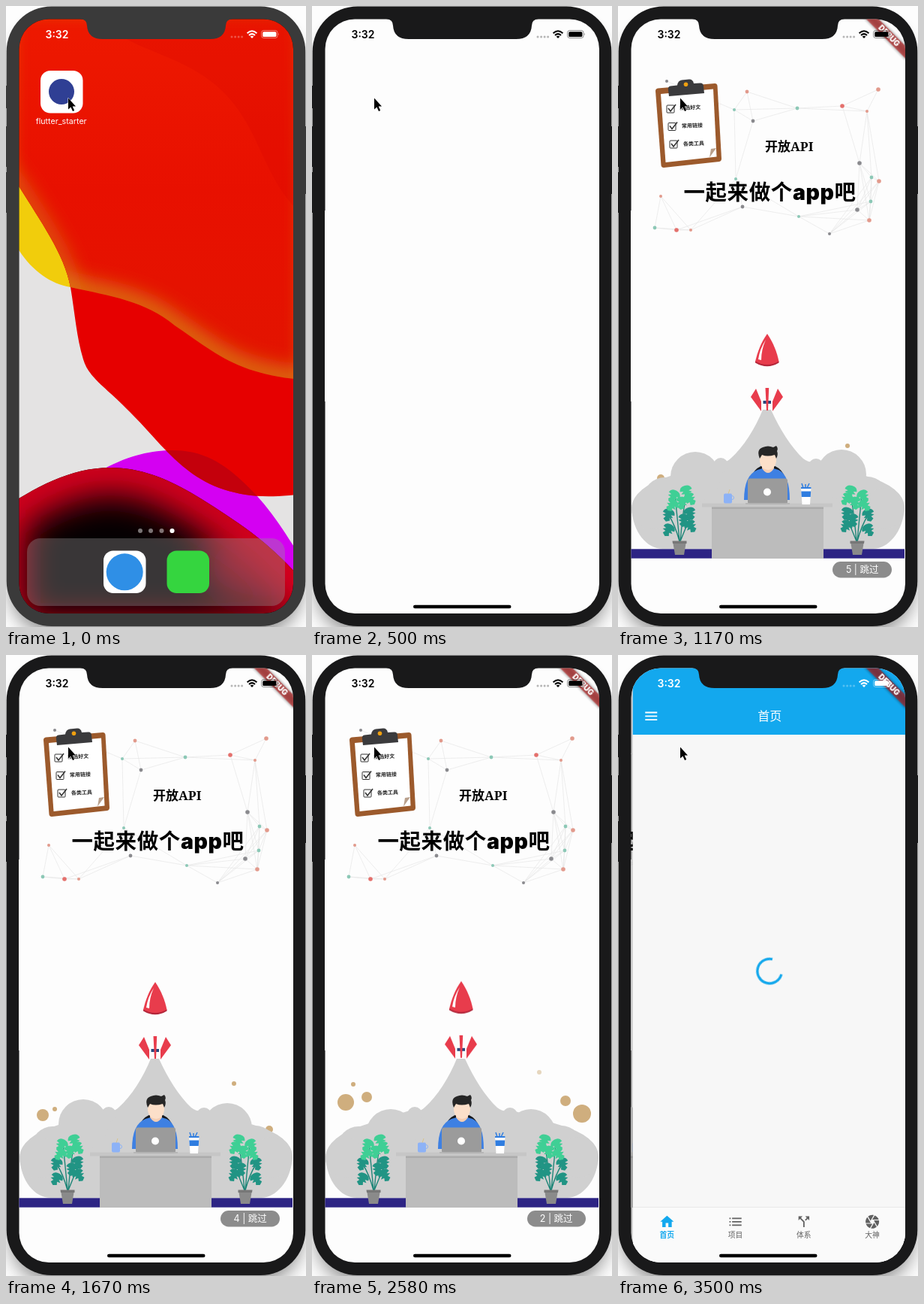
These frames come from a looping animation (400x826 px, 3.58 s). An HTML page:

```html
<!DOCTYPE html>
<html lang="zh">
<head>
<meta charset="utf-8">
<title>App launch</title>
<style>
html, body { margin: 0; height: 100%; overflow: hidden; background: #fdfdfd; }
svg { display: block; width: 100%; height: 100%; font-family: Inter, "Noto Sans CJK SC", "Noto Sans CJK", sans-serif; }
.mid { text-anchor: middle; }

/* Every animation is scrubbed by the clock through --d */
.a { animation: 3580ms linear var(--d, 0ms) infinite paused; }
.case { animation-name: wake; fill: currentColor; }
.home { animation-name: dim; }
.wall { animation-name: sink; }
.icons { animation-name: shrink; transform-origin: 200px 413px; }
.hbar { animation-name: hbar; color: #fff; }
.card { animation-name: open; fill: #fdfdfd; }
.bar { animation-name: bar; }
.pill { animation-name: pill; }
.pad { animation-name: pad; }
.banner { animation-name: late; }
.splash { animation-name: splash; }
.lottie { animation-name: lottie; }
.rocket { animation-name: lift; }
.page { animation-name: slide; }
.ring { animation-name: spin; transform-origin: 200.4px 420.5px; }
.ball { animation-name: rise; }

@keyframes wake { 0%, 1% { color: #3a3a3a } 1.2%, 100% { color: #19191a } }
@keyframes dim {
  0%, 1.2% { filter: blur(0) brightness(1) }
  2.33% { filter: blur(2px) brightness(.9) }
  4.65% { filter: blur(7px) brightness(.6) }
  9.3% { filter: blur(10px) brightness(.5); visibility: visible }
  13%, 100% { filter: blur(10px) brightness(.5); visibility: hidden }
}
@keyframes sink { 0%, 1.2% { transform: none } 4.65%, 100% { transform: translateY(8px) } }
@keyframes shrink { 0%, 1.2% { transform: none } 4.65% { transform: scale(.965) } 9.3%, 100% { transform: scale(.94) } }
@keyframes hbar { 0%, 1.2% { opacity: 1 } 4.65% { opacity: .42 } 7%, 100% { opacity: 0 } }
@keyframes open {
  0%, 1.2% { x: 46px; y: 86px; width: 57px; height: 57px; rx: 13px; opacity: 0 }
  2.33% { x: 42px; y: 86px; width: 100px; height: 130px; rx: 20px; opacity: .6 }
  4.65% { x: 26px; y: 75px; width: 275px; height: 502px; rx: 39px; opacity: 1 }
  6.98% { x: 19px; y: 27px; width: 350px; height: 725px; rx: 39px }
  9.3% { x: 18px; y: 19px; width: 363px; height: 782px; rx: 38px }
  11.63%, 100% { x: 17px; y: 17px; width: 367px; height: 792px; rx: 38px; opacity: 1 }
}
@keyframes bar {
  0%, 3% { opacity: 0; color: #000; transform: translate(12.8px, 61.4px) scale(.753) }
  4.65% { opacity: 1; transform: translate(12.8px, 61.4px) scale(.753) }
  6.98% { transform: translate(1.7px, 9.7px) scale(.959) }
  9.3% { transform: translate(.1px, 1.1px) scale(.9945) }
  11.63% { transform: none }
  89.5% { color: #000 }
  89.6%, 100% { color: #fff; opacity: 1; transform: none }
}
@keyframes pill { 0%, 8% { opacity: 0 } 13.9%, 100% { opacity: 1 } }
@keyframes late { 0%, 22.5% { visibility: hidden } 22.6%, 100% { visibility: visible } }
@keyframes lottie { 0%, 24.5% { visibility: hidden } 24.6%, 100% { visibility: visible } }
@keyframes splash {
  0%, 22.5% { opacity: 0 }
  22.6% { opacity: 1 }
  87.15% { opacity: 1; transform: none; animation-timing-function: cubic-bezier(.35, .91, .33, .97) }
  98.74%, 100% { opacity: 1; transform: translateX(-122px) }
}
@keyframes slide {
  0%, 87.15% { transform: translateX(376px); animation-timing-function: cubic-bezier(.35, .91, .33, .97) }
  98.74%, 100% { transform: none }
}
@keyframes pad { 0%, 71% { x: 286px; width: 79px } 71.1%, 100% { x: 287px; width: 78px } }
@keyframes lift { 0%, 32.56% { transform: none } 46.51% { transform: translateY(-1px) } 72.09% { transform: translateY(-2.2px) } 100% { transform: translateY(-3px) } }
@keyframes spin { 0%, 87% { transform: rotate(-200deg) } 97.67% { transform: rotate(15deg) } 100% { transform: rotate(60deg) } }
@keyframes rise {
  0%, 24% { transform: translate(var(--p0)) scale(var(--s)) }
  32.56% { transform: translate(var(--p0)) scale(var(--r0)) }
  46.51% { transform: translate(var(--p1)) scale(var(--r1)); opacity: 1 }
  72.09% { transform: translate(var(--p2)) scale(var(--r2)); opacity: var(--o, 1) }
  88.37%, 100% { transform: translate(var(--p3)) scale(var(--r3)); opacity: calc(var(--o, 1) * 2 - 1) }
}
</style>
</head>
<body>
<svg viewBox="0 0 400 826">
<defs>
  <clipPath id="screen"><rect x="17.5" y="17.5" width="365.5" height="790.5" rx="39.5"/></clipPath>
  <path id="red" d="M-10-10V205L18 241C45 285 78 330 86 374C92 410 94 440 103 470C110 495 135 508 170 545C205 580 235 625 290 643C325 654 355 655 410 647V-10Z"/>
  <path id="warm" d="M-10-10V290L18 326C35 352 60 370 86 374C140 386 185 392 225 425C280 462 310 493 410 498V-10Z"/>
  <path id="violet" d="M130 616C165 597 195 591 222 591C270 591 300 615 335 652C360 680 375 705 410 760V830H130Z"/>
  <path id="hill" d="M-10 672C40 640 85 614 140 614C205 614 260 655 310 688C345 712 370 735 410 780V850H-10Z"/>
  <clipPath id="inRed"><use href="#red"/></clipPath>
  <clipPath id="inWarm"><use href="#warm"/></clipPath>
  <clipPath id="inHill"><use href="#hill"/></clipPath>
  <linearGradient id="warmFill" x2="0" y2="1"><stop stop-color="#ee1a00"/><stop offset=".5" stop-color="#e81000"/><stop offset="1" stop-color="#e21400"/></linearGradient>
  <linearGradient id="edge"><stop stop-color="#000" stop-opacity="0"/><stop offset="1" stop-color="#000" stop-opacity=".25"/></linearGradient>
  <filter id="soft" x="-30%" y="-30%" width="160%" height="160%"><feGaussianBlur stdDeviation="13"/></filter>
  <filter id="haze" x="-50%" y="-50%" width="200%" height="200%"><feGaussianBlur stdDeviation="22"/></filter>
  <filter id="thin" x="-30%" y="-30%" width="160%" height="160%"><feGaussianBlur stdDeviation="2"/></filter>

  <g id="status">
    <text class="mid" x="68" y="43" font-size="14" font-weight="600" fill="currentColor">3:32</text>
    <g fill="currentColor" opacity=".28"><circle cx="301" cy="41" r="1.5"/><circle cx="305.6" cy="41" r="1.5"/><circle cx="310.1" cy="41" r="1.5"/><circle cx="314.6" cy="41" r="1.5"/></g>
    <g fill="none" stroke="currentColor" stroke-width="2"><path d="M321.6 36.2Q328 30.4 334.4 36.2"/><path d="M324 39Q328 35.3 332 39"/></g>
    <path d="M328 43L325.6 40.6Q328 38.7 330.4 40.6Z" fill="currentColor"/>
    <rect x="340.6" y="32.6" width="21.4" height="9.9" rx="2.8" fill="none" stroke="currentColor" opacity=".45"/>
    <rect x="342.2" y="34.2" width="18.2" height="6.7" rx="1.5" fill="currentColor"/>
    <path d="M363 36q1.6 1.5 0 3z" fill="currentColor" opacity=".5"/>
  </g>
  <g id="tick" fill="none" stroke="#333"><rect x="-5" y="-5" width="10" height="10" rx="1"/><path d="M-3-1L0 3 7-6" stroke-width="1.6"/></g>
  <g id="plant">
    <path d="M82 712C80 690 78 670 76 652M83 712C85 690 88 665 91 648M82 712Q76 690 68 678M83 712Q90 695 96 680" fill="none" stroke="#1d8577" stroke-width="1.4"/>
    <g id="leaves"></g>
    <path d="M73 712H91L88 730H76Z" fill="#8a8a8a"/><path d="M72.5 711.5H91.5V715H73Z" fill="#777"/>
  </g>
</defs>

<rect x="6" y="26" width="388" height="810" rx="60" opacity=".45" filter="url(#soft)"/>
<g class="a case">
  <rect x=".7" y=".5" width="398.6" height="824.5" rx="60"/>
  <path d="M0 106h3v30H0zM0 160h3v54H0zM0 221h3v54H0zM397 160h3v90h-3z"/>
</g>

<g clip-path="url(#screen)">
  <rect x="17" y="17" width="367" height="792"/>
  <g class="a home">
    <g class="a wall">
      <rect x="-10" y="-20" width="420" height="870" fill="#e4e3e3"/>
      <rect x="-10" y="-20" width="420" height="20" fill="#ee1a00"/>
      <use href="#violet" fill="#d400f2"/>
      <use href="#warm" fill="#f1cd0c"/>
      <use href="#red" fill="#e60000"/>
      <g clip-path="url(#inRed)">
        <use href="#violet" fill="#b80010" opacity=".75"/>
        <use href="#warm" fill="url(#warmFill)"/>
        <g clip-path="url(#inWarm)" fill="none" stroke="#da7a14">
          <use href="#warm" stroke-width="24" filter="url(#soft)"/>
          <use href="#red" stroke-width="14" filter="url(#soft)"/>
        </g>
        <path d="M130 18C160 60 230 60 285 110C345 165 340 240 410 290V-10H130Z" fill="#d00000" opacity=".2"/>
      </g>
      <use href="#hill" fill="#050002"/>
      <g clip-path="url(#inHill)">
        <ellipse cx="345" cy="745" rx="85" ry="55" fill="#8a0016" filter="url(#haze)"/>
        <use href="#hill" fill="none" stroke="#d8001c" stroke-width="72" filter="url(#haze)"/>
      </g>
    </g>
    <g class="a icons">
      <g fill="#fff"><g opacity=".45"><circle cx="179" cy="698" r="3"/><circle cx="193" cy="698" r="3"/><circle cx="207.5" cy="698" r="3"/></g><circle cx="221.5" cy="698" r="3.1"/></g>
      <rect x="28" y="708" width="344" height="90" rx="18" fill="#969696" opacity=".36"/>
      <rect x="130" y="724.5" width="56.5" height="56.5" rx="13" fill="#fff"/><circle cx="158.2" cy="752.8" r="24.5" fill="#2f8fe6"/>
      <rect x="214.5" y="724.5" width="56.5" height="56.5" rx="13" fill="#35d53f"/>
      <rect x="46" y="86" width="56.5" height="56.5" rx="13" fill="#fff"/><circle cx="74" cy="114" r="17" fill="#2f3f94"/>
      <text class="mid" x="73.7" y="157" font-size="10.7" fill="#fff">flutter_starter</text>
    </g>
  </g>
  <use class="a hbar" href="#status"/>
  <rect class="a card"/>

  <g class="a splash">
    <g id="net" stroke="#e2e2e2" stroke-width=".6"></g>
    <path d="M50 113Q50 110 53 109.5L129 103Q132 103 132.5 106L138 203Q138 206 135 207L61 215Q58 215 57.5 212Z" fill="#9c5a2c"/>
    <path d="M57 117L127 110.5L131.500 200.5L63.5 208Z" fill="#fff"/>
    <path d="M122 201.5L124 190L131 189Z" fill="#b9a08c"/>
    <path d="M67 112Q66 107 70 106.5L79 105.5Q80 99 85 98.5L95 97.5Q100 97.5 101 103L110 102.5Q114 102.5 114 107L115 116L68 120Z" fill="#3b3b3d"/>
    <circle cx="90.5" cy="104.3" r="2.8" fill="#f0a010"/>
    <use href="#tick" x="70" y="137"/><use href="#tick" x="72" y="160.5"/><use href="#tick" x="74" y="184"/>
    <g font-size="7" font-weight="700" fill="#222" transform="rotate(-2 85 160)"><text x="83" y="138">精选好文</text><text x="85" y="162">常用链接</text><text x="86" y="186">各类工具</text></g>
    <text class="mid" x="228.3" y="192.5" font-size="17" font-weight="700" style="font-family:'Noto Serif','Noto Sans CJK SC','Noto Sans CJK',serif">开放API</text>
    <text class="mid" x="202.5" y="258" font-size="28.5" font-weight="900" letter-spacing=".6">一起来做个app吧</text>

    <g class="a lottie">
      <g id="bubbles" fill="#cfae7e"></g>
      <rect x="17.5" y="722.3" width="364.5" height="12.4" fill="#2d2484"/>
      <g fill="#d0d0d0">
        <path d="M193 537H204C215 562 231 587 247 602Q256 609 268 606L330 625Q382 640 382 668C380 700 360 722 340 722H60C38 722 20 700 18 668Q20 640 70 625L130 606Q143 609 150 602C167 587 183 562 193 537Z"/>
        <circle cx="137" cy="611" r="10"/><circle cx="264" cy="612" r="10"/>
        <circle cx="62" cy="655" r="28"/><circle cx="45" cy="669" r="27"/>
        <circle cx="332" cy="655" r="29"/><circle cx="355" cy="668" r="27"/>
        <g id="clouds"></g>
      </g>
      <g class="a rocket">
        <path d="M199 436C207 448 212 460 214.5 473Q199 484 183 473C186 460 191 447 199 436Z" fill="#e83c4c"/>
        <path d="M183 472.5Q199 481.5 214.5 472.5V474.5Q199 484 183 474.5Z" fill="#b3263a"/>
        <path d="M197 444Q189 456 187 470L191 471Q191 457 197 444Z" fill="#fff"/>
        <rect x="193.5" y="525" width="10.5" height="4" fill="#27477e"/>
        <path d="M184 509L177 520L191 539V526ZM196.5 508H201.2L200 538H198ZM213 509L220 520L206 539V526Z" fill="#e83c4c"/>
      </g>
      <path d="M174 640Q178 611 200 610Q222 611 226 640Z" fill="#16181d"/>
      <path d="M168 657Q168 624 186 617L200 613L214 617Q229 624 229 657Z" fill="#3e80e2"/>
      <path d="M192 606H208V615Q200 627 192 615Z" fill="#f4cdb2"/>
      <path d="M189 594H211V606Q209 617 200 617Q191 617 189 606Z" fill="#fcdfc9"/>
      <path d="M189 602Q184 590 193 587Q200 584 207 587L211 585Q214 588 212 592Q214 597 211 602L209 597Q199 600 192 597Z" fill="#262626"/>
      <rect x="112" y="661.5" width="174" height="5" fill="#c6c6c6"/>
      <rect x="125" y="666.5" width="149" height="68.5" fill="#bcbcbc"/><rect x="125" y="666.5" width="149" height="2.5" fill="#acacac"/>
      <rect x="173" y="628.5" width="53" height="34" rx="3" fill="#9b9b9b"/><rect x="170" y="661" width="59" height="1.8" fill="#b4b4b4"/>
      <circle cx="199" cy="646.5" r="5" fill="#fff"/>
      <path d="M147 649L149 643" stroke="#d8c48c" fill="none"/>
      <rect x="141" y="648.5" width="11" height="13" rx="2" fill="#8db2f6"/><circle cx="152" cy="654" r="2.5" fill="none" stroke="#8db2f6"/>
      <path d="M247 641L245 635M252 641L255 635M250 641V636" stroke="#2f7de0" stroke-width="1.5"/>
      <path d="M244 640H257.5L256 663H245.5Z" fill="#fff"/><path d="M244 640H257.5V642H244ZM244.3 645.5H257.2L256.7 653H244.8Z" fill="#2f7de0"/>
      <use href="#plant"/><use href="#plant" transform="matrix(-1 0 0 1 401 0)"/>
    </g>
    <rect class="a pad" y="739" height="21.5" rx="10.7" fill="#8c8c8c"/>
    <text class="mid" x="325.7" y="754" font-size="12.5" fill="#fff"><tspan id="count">5</tspan> | 跳过</text>
  </g>

  <g class="a page">
    <rect x="8" y="17" width="10" height="792" fill="url(#edge)"/>
    <rect x="18" y="17" width="366" height="792" fill="#f7f7f7"/>
    <rect x="18" y="17" width="366" height="89" fill="#13a8ee"/>
    <path d="M34.5 76.5h16M34.5 81.3h16M34.5 86.1h16" stroke="#fff" stroke-width="1.8"/>
    <text class="mid" x="200.5" y="87" font-size="16" font-weight="500" fill="#fff">首页</text>
    <circle class="a ring" cx="200.4" cy="420.5" r="16.3" pathLength="360" stroke-dasharray="268 92" fill="none" stroke="#14a8ec" stroke-width="3.4"/>
    <rect x="18" y="735" width="366" height="74" fill="#fafafa"/><rect x="18" y="734.3" width="366" height=".7" fill="#e2e2e2"/>
    <g id="nav" class="mid" font-size="9.8"></g>
  </g>

  <g class="a banner" transform="translate(383 18) rotate(45)">
    <rect x="-60" y="24.7" width="120" height="11.7" opacity=".5" filter="url(#thin)"/>
    <rect x="-60" y="24.7" width="120" height="11.7" fill="#b71c1c" opacity=".63"/>
    <text class="mid" y="34.2" font-size="10.2" font-weight="900" fill="#fff">DEBUG</text>
  </g>
  <use class="a bar" href="#status"/>
  <rect class="a pill" x="135" y="796.7" width="130.5" height="4.6" rx="2.3"/>
</g>

<path class="a case" d="M99 17Q108 18 108 26Q109 44 129 44H272Q292 44 293 26Q293 18 302 17Z"/>
<path d="M83 122.5V137.5L86.4 134.4L89 140L91.2 139L88.7 133.5H93Z" stroke="#fff" stroke-width="1" paint-order="stroke"/>
</svg>

<script>
const LOOP = 3580, STEPS = 43;
const add = (id, html) => document.getElementById(id).insertAdjacentHTML('beforeend', html);

// A unit circle moving through four poses of x, y, radius
const ball = (start, poses, fade = 1) => {
  let style = `--s:${start};--o:${fade}`;
  for (let i = 0; i < 4; i++) {
    const [x, y, r] = poses.slice(i * 3, i * 3 + 3);
    style += `;--p${i}:${x}px,${y}px;--r${i}:${r}`;
  }
  return `<circle class="a ball" r="1" style="${style}"/>`;
};
add('bubbles', [
  ball(0, [57, 628, 5, 49, 612, 8, 45, 595, 11, 43, 583, 13]),
  ball(0, [64, 620, 0, 65, 604, 3, 55, 571, 3, 53, 559, 3]),
  ball(0, [80, 612, 0, 78, 608, 0, 73, 588, 7, 70, 577, 9]),
  ball(0, [306, 585, 3, 304, 570, 3, 303, 555, 3, 302, 546, 3], .5),
  ball(0, [345, 640, 0, 351, 631, 5, 360, 610, 12, 364, 597, 14]),
  ball(0, [330, 620, 0, 332, 615, 0, 338, 593, 7, 341, 582, 9])
].join(''));
add('clouds',
  ball(33, [103, 626, 33, 103, 624, 33, 105, 637, 33, 106, 643, 33]) +
  ball(33, [298, 623, 33, 295, 629, 33, 292, 637, 33, 291, 643, 33]));

// Network: nearby nodes are joined
const tones = { g: '#8a8a8e', p: '#e29a8c', t: '#8cc8b6', r: '#e4706c' };
const nodes = `65,100,g 172,114,p 347,111,p 155,138,t 239,136,t 299,133,r 332,140,p 180,153,g 322,209,g
  157,230,t 338,228,t 348,233,p 57,253,p 337,260,t 319,271,g 241,280,t 166,267,g 78,298,r 97,298,p
  49,295,t 335,285,p 282,303,g`.split(/\s+/).map(s => s.split(','));
nodes.forEach(([x, y], i) => nodes.slice(i + 1).forEach(([u, v]) => {
  if (Math.hypot(x - u, y - v) < 100) add('net', `<path d="M${x} ${y}L${u} ${v}"/>`);
}));
nodes.forEach(([x, y, c], i) => add('net', `<circle cx="${x}" cy="${y}" r="${2 + i % 3 * .4}" fill="${tones[c]}" stroke="none"/>`));

// Leaves: x, y, turn, dark
[[67, 697, 30, 1], [97, 692, -35, 1], [67, 677, 20, 1], [96, 675, -20, 1], [88, 684, 15, 1],
 [74, 652, 30, 0], [91, 646, -15, 0], [85, 661, 10, 0], [96, 656, -40, 0], [72, 664, 40, 0]]
  .forEach(([x, y, turn, dark]) => add('leaves',
    `<path transform="translate(${x} ${y}) rotate(${turn}) scale(.92)" fill="${dark ? '#219484' : '#3fcf95'}"
      d="M0-9Q8-9 9-2L4-1L8 2L3 3L5 7L0 10L-5 7L-3 3L-8 2L-4-1L-9-2Q-8-9 0-9Z"/>`));

[['首页', 'M10 20v-6h4v6h5v-8h3L12 3 2 12h3v8z'],
 ['项目', 'M3 13h2v-2H3zm0 5h2v-2H3zm0-10h2V6H3zm4 5h14v-2H7zm0 5h14v-2H7zM7 6v2h14V6z'],
 ['体系', 'M14 4l2.3 2.3-2.9 2.9 1.4 1.4 2.9-2.9L20 10V4zm-4 0H4v6l2.3-2.3 4.7 4.7V20h2v-8.4L7.7 6.3z'],
 ['大神', 'M9.4 10.5l4.77-8.26C13.47 2.09 12.75 2 12 2c-2.4 0-4.6.85-6.32 2.25l3.66 6.35zM21.54 9c-.92-2.92-3.15-5.26-6-6.34L11.88 9zm.26 1h-7.49l5.05 8.75C21 16.97 22 14.61 22 12c0-.69-.07-1.35-.2-2zM8.54 12l-3.9-6.75C3.01 7.03 2 9.39 2 12c0 .69.07 1.35.2 2h7.49zm-6.08 3c.92 2.92 3.15 5.26 6 6.34L12.12 15zm11.27 0l-3.9 6.76c.7.15 1.42.24 2.17.24 2.4 0 4.6-.85 6.32-2.25l-3.66-6.35z']
].forEach(([label, icon], i) => {
  const x = 18 + 365 / 8 * (2 * i + 1);
  add('nav', `<g fill="${i ? '#616161' : '#13a8ee'}"><path transform="translate(${x - 10.8} 743) scale(.9)" d="${icon}"/>
    <text x="${x}" y="774.5" font-weight="${i ? 400 : 600}">${label}</text></g>`);
});

const count = document.getElementById('count');
const start = performance.now();
function draw() {
  const t = (performance.now() - start) % LOOP;
  const step = Math.min(STEPS - 1, Math.floor((t + 3.5) * STEPS / LOOP));
  document.documentElement.style.setProperty('--d', `${-step * LOOP / STEPS}ms`);
  count.textContent = Math.min(5, 5 - Math.floor((step - 13) / 6));
  requestAnimationFrame(draw);
}
draw();
</script>
</body>
</html>
```
